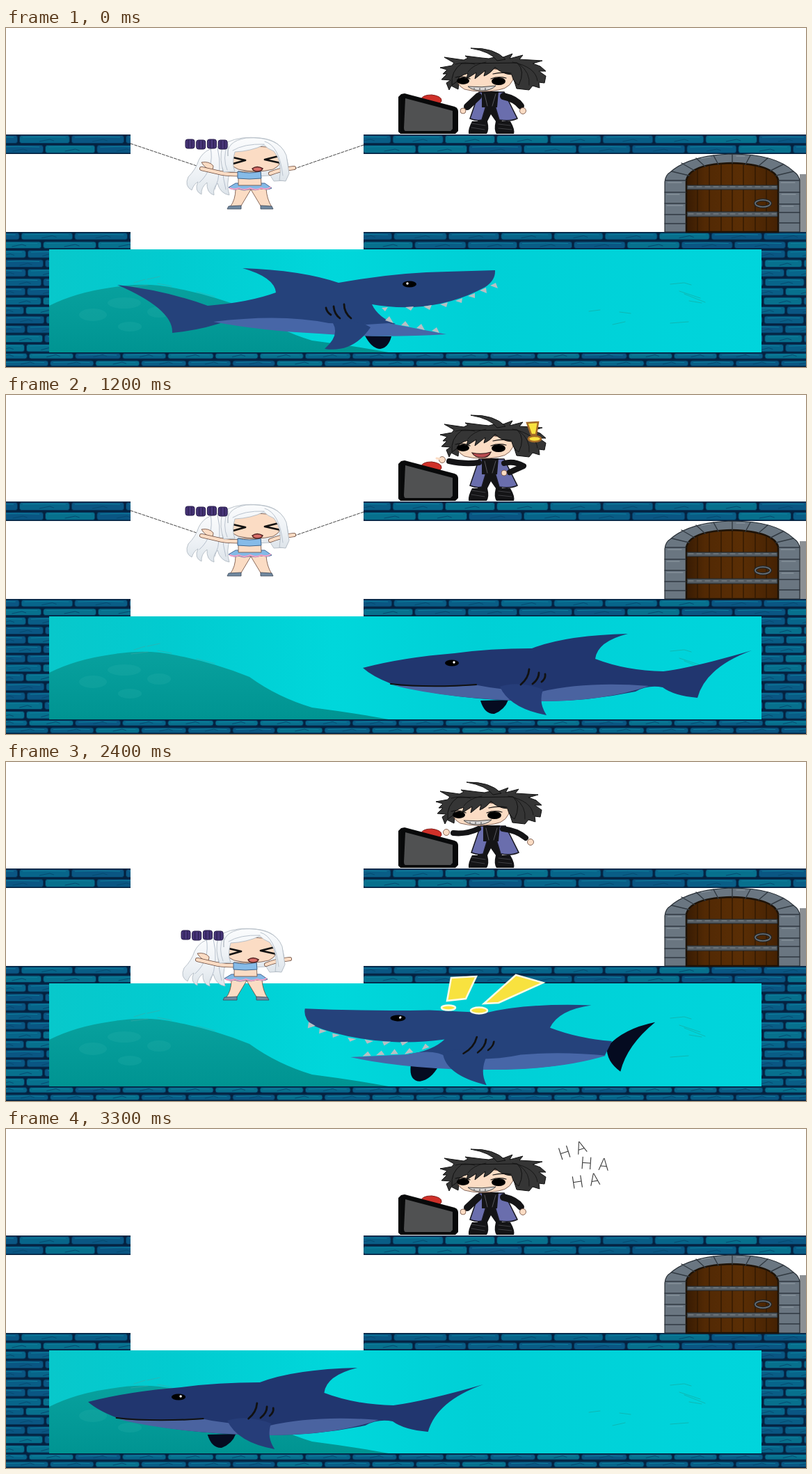
An HTML page for the animation above (3.76 s loop, 1150 by 487 pixels).

```html
<!DOCTYPE html>
<html lang="en">
<head>
<meta charset="utf-8">
<title>Shark tank</title>
<style>
  html, body { margin: 0; width: 100%; height: 100%; overflow: hidden; background: #fff; }
  #stage { display: block; width: 100vw; height: 100vh; }
  .part { visibility: hidden; }
  .part.on { visibility: visible; }
  .line { fill: none; stroke: #111; stroke-linecap: round; stroke-linejoin: round; }
  .hair { fill: #353535; stroke: #111; stroke-width: 1; }
  .skin { fill: #fbdcc4; stroke: #6b4a3c; stroke-width: .8; }
  .silver { fill: url(#silver); stroke: #b3bbc5; stroke-width: .9; }
  .black { fill: #141416; }
  .coat { fill: #6a6ead; stroke: #17171f; stroke-width: 1.5; }
  .limb { fill: none; stroke-linecap: round; stroke-linejoin: round; }
  .back { fill: #25427b; }
  .belly { fill: #4766a7; }
  .dark { fill: #050b20; }
  .teeth { fill: #b9bfc4; }
  .mark { fill: #f8e23f; stroke: #fffbe6; stroke-width: 2.5; }
  #ha text { font: 200 24px Inter, "Open Sans", sans-serif; letter-spacing: 8px; fill: #333; }
</style>
</head>
<body>
<svg id="stage" viewBox="0 0 1150 487" preserveAspectRatio="none">
  <defs>
    <linearGradient id="water">
      <stop offset="0" stop-color="#08c8cb"/><stop offset=".18" stop-color="#02cbd0"/>
      <stop offset=".4" stop-color="#00d7db"/><stop offset=".6" stop-color="#00d0d6"/>
      <stop offset="1" stop-color="#00d5dc"/>
    </linearGradient>
    <linearGradient id="hill" x2="0" y2="1">
      <stop offset="0" stop-color="#08a19e"/><stop offset="1" stop-color="#009492"/>
    </linearGradient>
    <linearGradient id="wood">
      <stop offset="0" stop-color="#371b03"/><stop offset=".2" stop-color="#522904"/>
      <stop offset=".6" stop-color="#5a2e05"/><stop offset="1" stop-color="#452203"/>
    </linearGradient>
    <linearGradient id="silver" x2="0" y2="1">
      <stop offset="0" stop-color="#fbfcfd"/><stop offset=".6" stop-color="#edf1f5"/>
      <stop offset="1" stop-color="#dde4ea"/>
    </linearGradient>

    <g id="boyHead">
      <path class="hair" d="M624,57L641,54 644,50 630,42 658,46 664,43 660,40 684,43 694,44 706,41 712,43 728,37 724,44 743,39 738,45 771,47 757,51 768,55 776,62 766,62 776,69 774,79 766,78 767,86 757,83 752,89 734,87 728,68 690,60 652,68 650,88 640,83 637,89 633,79 639,75 626,74 634,66 628,66 634,60Z"/>
      <path class="skin" d="M649,64Q645,81 659,88Q682,94 708,89Q728,86 731,66Q700,52 649,64Z"/>
      <path class="hair" d="M641,82Q639,62 655,51L735,50Q747,62 737,82Q729,77 727,67Q712,66 703,56Q697,65 687,69L689,61 674,73 676,64 662,73 664,65Q650,69 648,77Z"/>
      <path class="hair" d="M668,29Q702,28 718,45L706,47Q697,34 668,29Z"/>
      <path class="line" stroke-width=".8" d="M646,52Q660,48 674,52M664,63Q672,52 690,49M738,52Q754,64 752,82M728,49Q762,56 764,76"/>
      <ellipse cx="657" cy="76" rx="9" ry="5"/><ellipse cx="708" cy="76.500" rx="10" ry="5.500"/>
      <path class="line" stroke-width="1.200" d="M700,66Q712,63 726,65M646,71Q657,68 667,73M697,73Q708,69 719,72"/>
    </g>
    <path id="grin" d="M664,84Q684,86 704,83Q697,90 684,90Q671,90 664,84ZM673,86V88M681,86V89M689,86V89" fill="#d9d6d5" stroke="#444" stroke-width="1"/>
    <g id="boyLegs">
      <path class="black" d="M682,110H706L713,134H725Q732,146 730,152H705Q701,146 704,134L697,124 692,134Q695,146 691,152H665Q664,145 670,134H678Z"/>
      <path class="line" style="stroke:#4b4b50" stroke-width=".8" d="M669,137L689,140M669,143L688,146M708,138L725,140M708,144L727,146"/>
    </g>
    <g id="boyCoat">
      <path class="coat" d="M680,92L667,130Q676,134 684,132L690,112 703,112 709,132Q724,135 735,130L716,92Z"/>
      <path class="black" d="M684,91H708L706,114H684Z"/>
      <path class="line" style="stroke:#55555c" stroke-width="1" d="M688,95L692,112M704,95L699,112"/>
    </g>

    <path id="girlArms" class="limb" d="M337,210Q318,211 303,207L281,202M380,209Q394,203 414,201"/>
    <g id="girlTop">
      <path class="silver" d="M318,164Q338,155 365,158Q398,161 404,189Q409,207 402,219L385,220 380,212 335,214 314,206Z"/>
      <path class="silver" d="M318,170Q287,169 277,190Q273,203 262,214Q256,227 267,233Q270,224 276,221Q270,234 281,239Q280,229 289,222Q288,237 299,240Q297,230 304,223Q308,238 321,240Q316,225 322,206Z"/>
      <path class="line" style="stroke:#b5bfcc" stroke-width="1" d="M294,172Q300,202 278,222M304,172Q312,205 300,232M312,174Q308,200 316,232"/>
      <path class="skin" d="M297,205Q286,202 281,193Q292,191 298,198Z"/>
      <use href="#girlArms" stroke="#6b4a3c" stroke-width="6"/>
      <use href="#girlArms" stroke="#fbdcc4" stroke-width="4.500"/>
      <path class="skin" d="M334,206H366L367,226H334Z"/>
      <path d="M333,206Q350,210 366,206L367,216Q350,218 333,216Z" fill="#86bbe8" stroke="#41678e"/>
      <path class="skin" d="M319,180Q318,197 334,203Q360,209 384,203Q399,196 397,176Q360,163 319,180Z"/>
      <path class="line" stroke-width="2.800" d="M322,185L344,190 323,196M396,183L372,189 395,194"/>
      <path d="M354,202Q361,197 369,202Q367,206 361,206Q356,206 354,202Z" fill="#d96d67" stroke="#502020" stroke-width="1.500"/>
      <path class="silver" d="M319,184Q316,163 345,158Q392,155 403,183L407,209 402,220 393,219Q398,192 385,177Q375,173 371,168Q352,177 329,178Q324,195 329,206L313,207Q306,190 311,170L319,166Z"/>
      <path class="line" style="stroke:#bac3ce" stroke-width="1" d="M372,163Q393,169 398,212M318,168Q311,188 318,204M326,176Q342,166 371,167"/>
    </g>
    <g id="skirt">
      <path d="M330,223H372L382,230Q375,234 367,230Q359,235 351,231Q342,235 335,231Q328,234 320,229Z" fill="#84b9e6" stroke="#466995"/>
      <path class="line" style="stroke:#ef9fc6" stroke-width="2" d="M322,230Q328,233 335,230Q342,234 351,230Q359,234 367,230Q375,233 380,229"/>
    </g>
    <g id="girlStand">
      <path class="skin" d="M330,231L352,232 337,257H322Q330,247 330,231ZM352,232L374,231Q375,246 382,257H367Z"/>
      <path d="M320,256L338,255V260H318ZM366,255L382,256 384,260H366Z" fill="#728aa1" stroke="#384657" stroke-width=".8"/>
      <use href="#skirt"/><use href="#girlTop"/>
      <g id="curlers" fill="#473578" stroke="#241947"/>
    </g>

    <g id="sharkOpen">
      <path class="dark" d="M966,363Q922,374 906,401Q910,421 934,435Q934,397 966,363Z"/>
      <path class="dark" d="M633,437Q636,459 652,459Q667,456 673,436Z"/>
      <path class="back" d="M462,361Q545,362 640,357L722,358Q776,342 869,342Q824,350 818,376Q862,390 911,392L906,413Q830,438 744,438L650,431 625,421Q659,415 672,398Q632,405 598,404Q527,402 480,385Q463,376 462,361Z"/>
      <path class="belly" d="M544,428L625,421Q660,411 684,424Q745,427 786,416Q842,409 908,413Q845,436 745,439Q632,443 544,428Z"/>
      <path class="back" d="M674,417Q686,449 748,461Q733,442 738,419Q702,405 674,417Z"/>
      <path class="teeth" d="M472,380L473,389 483,385ZM490,389L491,396 501,392ZM510,395L512,401 521,397ZM533,400L538,406 546,402ZM558,402L563,408 571,404ZM584,404L588,410 596,404ZM610,404L614,409 621,403ZM561,426L567,419 573,425ZM580,424L586,417 592,423ZM600,422L604,414 611,421ZM620,421L625,412 632,418ZM643,414L646,405 653,410Z"/>
      <ellipse cx="598" cy="370" rx="11" ry="4.500"/><circle cx="601" cy="369" r="1.700" fill="#fff"/>
      <path class="line" stroke-width="2.800" d="M717,393Q717,408 704,417M731,396Q733,406 724,415M743,399Q744,405 738,411"/>
    </g>
    <g id="sharkClosed">
      <path class="dark" d="M682,439Q688,459 702,458Q717,452 722,438Z"/>
      <path d="M513,392Q570,377 645,371Q695,364 756,364Q805,345 894,343Q850,354 847,379Q891,396 945,397Q990,391 1072,367Q1006,391 994,435Q960,432 944,420Q923,416 905,426Q833,441 760,440Q640,438 554,415Q526,404 513,392Z" fill="#21366f"/>
      <path d="M556,417Q614,421 678,417Q717,425 770,426Q835,411 924,418Q858,441 760,440Q637,437 556,417Z" fill="#4a63a0"/>
      <path d="M710,419Q724,450 777,460Q765,442 772,423Q737,410 710,419Z" fill="#263d79"/>
      <path class="line" stroke-width="2" d="M553,415Q607,421 676,416"/>
      <ellipse cx="641" cy="385" rx="10" ry="4.500"/><circle cx="644" cy="384" r="1.700" fill="#fff"/>
      <path class="line" stroke-width="2.800" d="M752,394Q751,407 740,416M766,399Q766,408 757,415M775,401Q776,407 770,412"/>
    </g>
    <g id="sharkWide">
      <path class="dark" d="M516,442Q526,461 538,461Q550,459 554,443Z"/>
      <path class="back" d="M160,369Q230,377 290,399Q350,394 388,380Q386,358 340,345Q425,348 478,366Q560,351 635,350L703,348Q704,362 689,372Q642,398 585,401Q552,402 526,397Q535,416 560,425L520,440 430,437 320,420Q282,434 239,438Q241,404 160,369Z"/>
      <path class="belly" d="M298,422Q396,410 464,424L519,426 550,424 633,440Q535,446 450,439Q366,435 298,422Z"/>
      <path class="back" d="M470,424Q480,442 458,461Q499,467 524,430Q496,413 470,424Z"/>
      <path class="teeth" d="M704,366L707,374 696,370ZM690,373L691,381 681,377ZM674,381L674,388 664,385ZM656,388L655,395 646,392ZM635,394L633,401 624,397ZM612,398L609,405 600,400ZM586,400L582,406 574,401ZM540,402L545,407 549,401ZM545,420L551,414 557,424ZM568,427L574,421 580,429ZM590,431L597,425 602,434ZM612,435L619,430 623,438Z"/>
      <ellipse cx="580" cy="368" rx="10" ry="4.500"/><circle cx="577" cy="367" r="1.700" fill="#fff"/>
      <path class="line" stroke-width="2.800" d="M460,402Q461,408 467,412M471,400Q472,411 480,417M486,397Q486,409 496,417"/>
    </g>
  </defs>

  <rect width="1150" height="487" fill="#fff"/>

  <g id="tank">
    <rect x="61" y="318" width="1026" height="149" fill="url(#water)"/>
    <path d="M62,399Q100,380 150,373Q200,364 245,374Q300,385 350,405Q390,434 440,449Q495,456 550,466H62Z" fill="url(#hill)"/>
    <g fill="#2fb5ae" opacity=".22">
      <ellipse cx="125" cy="412" rx="20" ry="9"/><ellipse cx="170" cy="395" rx="24" ry="8"/>
      <ellipse cx="178" cy="429" rx="17" ry="7"/><ellipse cx="220" cy="408" rx="17" ry="8"/>
    </g>
    <path class="line" style="stroke:#3fa9a5" opacity=".6" d="M184,366l16,-5M203,361l18,-4M218,367l20,4M274,379l26,7M180,372l24,-3"/>
    <path class="line" style="stroke:#17a89f" opacity=".65" d="M955,368l20,-2 10,3M968,378l30,10M975,382l30,12M982,392l18,3M955,424l26,-2M838,407l16,-2M882,408l16,2M872,426l18,-4"/>
  </g>
  <g id="walls"/>

  <g id="door">
    <path d="M1141,210H1150V293H1141Z" fill="#8c9094"/>
    <path d="M947,293V221Q948,211 955,207Q982,183 1043,181Q1106,181 1132,206Q1141,212 1141,221V293Z" fill="#6a7681" stroke="#252c33" stroke-width="1.200"/>
    <path d="M978,293V218Q984,195 1044,194Q1104,196 1110,218V293Z" fill="url(#wood)" stroke="#1d1207" stroke-width="2.500"/>
    <path class="line" style="stroke:#2c1602" stroke-width="1.200" d="M994,204V293M1011,198V293M1028,195V293M1044,195V293M1060,195V293M1077,198V293M1093,204V293"/>
    <path d="M979,226H1109V232H979ZM979,264H1109V271H979Z" fill="#555c62" stroke="#20262b"/>
    <path class="line" style="stroke:#8d959b" stroke-width=".8" stroke-dasharray="7 5" d="M981,228H1107M981,267H1107"/>
    <path class="line" style="stroke:#313941" stroke-width="1.400" d="M948,219H977M947,236H977M947,252H977M947,268H977M947,281H977M1111,219H1141M1111,236H1141M1111,253H1141M1111,265H1141M1111,280H1141M957,206L982,212M971,194L990,205M992,187L1005,199M1017,183L1024,196M1044,182V194M1070,183L1063,196M1095,187L1082,198M1117,196L1099,205M1132,206L1107,212"/>
    <path class="line" style="stroke:#929da6" stroke-width="1" d="M951,222H971M950,239H968M950,255H973M1114,222H1134M1115,239H1135M1115,256H1132M1000,187L1013,185M1050,184H1062"/>
    <ellipse cx="1088" cy="252" rx="11" ry="5" fill="none" stroke="#20262b" stroke-width="4"/>
    <ellipse cx="1088" cy="252" rx="11" ry="5" fill="none" stroke="#6d757b" stroke-width="1.500"/>
  </g>

  <g id="shark">
    <use id="wide" class="part" href="#sharkWide"/>
    <use id="open" class="part" href="#sharkOpen"/>
    <use id="closed" class="part" href="#sharkClosed"/>
  </g>
  <g id="alarm" class="part mark">
    <path d="M640,310L676,308 661,340 634,343ZM733,306L772,317 708,346 687,347Z"/>
    <ellipse cx="636" cy="353" rx="10" ry="3.500"/><ellipse cx="680" cy="357" rx="12" ry="4.500"/>
  </g>

  <g id="hang" class="part">
    <path d="M179,166L280,200M514,168L415,202" class="line" style="stroke:#444" stroke-width="1" stroke-dasharray="4 2"/>
    <use href="#girlStand"/>
  </g>
  <use id="fall" class="part" href="#girlStand" transform="translate(-6 82)"/>
  <g id="swim" class="part" transform="translate(7 186)">
    <path class="silver" d="M335,158Q285,155 274,178Q271,187 280,202Q264,224 272,236L282,227Q280,239 293,239L297,231Q303,240 315,238L334,210Z"/>
    <path class="skin" d="M330,228L350,231 337,242 305,254 293,253ZM360,229L377,227 419,247 411,252 382,242Z"/>
    <path d="M293,251L310,253 304,256H291ZM408,251L419,245 427,250 415,252Z" fill="#728aa1" stroke="#384657"/>
    <use href="#skirt"/><use href="#girlTop"/>
  </g>

  <g id="idle" class="part">
    <use href="#boyLegs"/><use href="#boyCoat"/>
    <path class="limb" stroke="#141416" stroke-width="10" d="M679,98L663,113M715,98Q733,102 740,112"/>
    <circle class="skin" cx="657" cy="119" r="4"/><circle class="skin" cx="743" cy="119" r="4.500"/>
    <use href="#boyHead"/><use href="#grin"/>
  </g>
  <g id="alert" class="part">
    <use href="#boyLegs"/><use href="#boyCoat"/>
    <path class="limb" stroke="#141416" stroke-width="8" d="M680,97Q660,100 637,95M716,98Q730,94 744,102L724,111"/>
    <circle class="skin" cx="627" cy="93" r="4.500"/><path class="line" style="stroke:#fbdcc4" stroke-width="3" d="M626,92L619,91"/><circle class="skin" cx="716" cy="112" r="4"/>
    <use href="#boyHead"/>
    <path d="M670,83Q684,86 697,82Q694,90 684,90Q674,90 670,83Z" fill="#b84c50" stroke="#361c1c" stroke-width="1.200"/>
    <path class="mark" style="stroke:#a36a28" stroke-width="1" d="M749,40L765,39 762,57H755Z"/><ellipse class="mark" style="stroke:#a36a28" cx="760" cy="63" rx="9" ry="4"/>
  </g>
  <g id="lean" class="part">
    <use href="#boyLegs"/><use href="#boyCoat" transform="matrix(1 0 -.55 1 63 0)"/>
    <path class="black" d="M692,94H719L702,131 674,133Z"/>
    <path class="limb" stroke="#141416" stroke-width="10" d="M727,97Q742,101 744,114"/><circle class="skin" cx="740" cy="121" r="4.500"/>
    <g transform="matrix(1 .05 -.4 1 52 -34.500)"><use href="#boyHead"/><use href="#grin"/></g>
  </g>
  <g id="podium">
    <path d="M597,102Q599,96 612,96Q627,98 626,105L623,109Z" fill="#cf3029" stroke="#801c18"/>
    <path d="M568,95L573,94 645,113Q650,115 650,120V148L646,152H567L564,149V99Z" fill="#08090a"/>
    <path d="M574,101L642,119V145L639,148H574Q572,147 572,144Z" fill="#505152"/>
  </g>
  <g id="press" class="part">
    <use href="#boyLegs"/><use href="#boyCoat" transform="translate(2 0)"/>
    <path class="limb" stroke="#141416" stroke-width="8" d="M679,96Q662,104 643,102M714,96Q734,98 747,109"/>
    <circle class="skin" cx="633" cy="101" r="4.500"/><circle class="skin" cx="754" cy="115" r="4.500"/>
    <g id="pressHead"><use href="#boyHead"/><use href="#grin"/></g>
  </g>

  <g id="ha" class="part">
    <text transform="translate(797 45) rotate(-18)">HA</text>
    <text transform="translate(825 57) rotate(4)">HA</text>
    <text transform="translate(814 86) rotate(-9)">HA</text>
  </g>
</svg>
<script>
const $ = id => document.getElementById(id);

function add(parent, tag, attrs) {
  const node = document.createElementNS("http://www.w3.org/2000/svg", tag);
  for (const key in attrs) node.setAttribute(key, attrs[key]);
  return parent.appendChild(node);
}

let seed = 11;
const random = () => (seed = seed * 16807 % 2147483647) / 2147483647;

// The first joint sits at `joint`; every other row is shifted by almost half a brick.
function wall(x, y, width, height, rowHeight, length, joint) {
  const box = add($("walls"), "svg", { x, y, width, height });
  add(box, "rect", { width, height, fill: "#04213f" });
  const tones = ["#07658a", "#0a5683", "#07708d", "#095d86"];
  for (let row = 0, top = 0; top < height - 1; row++, top += rowHeight) {
    let left = joint - length + (row % 2 ? length * .45 : 0);
    if (left > 0) left -= length;
    while (left < width) {
      const size = length * (.96 + random() * .08);
      const right = left + size;
      add(box, "rect", {
        x: left + 1.5, y: top + 1.5, width: size - 3, height: rowHeight - 3, rx: 3,
        fill: tones[random() * 4 | 0], stroke: "#06365b"
      });
      add(box, "path", {
        d: `M${left + 6},${top + 4}Q${left + size / 2},${top + 2.5} ${right - 7},${top + 4}`,
        fill: "none", stroke: "#0d7f9d"
      });
      add(box, "path", {
        d: `M${left + size * .4},${top + rowHeight - 4}l${size * .2},-3 6,2`,
        fill: "none", stroke: "#064a70"
      });
      left = right;
    }
  }
}

for (const [y, height] of [[153, 28], [293, 25]]) {
  wall(0, y, 179, height, height / 2, 76, 21);
  wall(514, y, 636, height, height / 2, 76, 40);
}
wall(0, 318, 62, 148, 13.5, 58, 28);
wall(1086, 318, 64, 148, 13.5, 58, 34);
wall(0, 466, 1150, 21, 10.5, 66, 30);

for (let i = 0; i < 4; i++) {
  const x = 258 + i * 15.7;
  const y = 160 + (i % 2);
  add($("curlers"), "rect", { x, y, width: 13, height: 13, rx: 3 });
  add($("curlers"), "path", { d: `M${x + 4},${y + 1}v11M${x + 9},${y + 1}v11` });
}

const flip = x => `translate(${x} 0) scale(-1 1)`;
const scenes = [
  ["idle hang wide", ""],
  ["idle hang open", flip(1326)],
  ["idle hang open", flip(1473)],
  ["idle hang closed", "translate(12 0)"],
  ["alert hang closed", ""],
  ["lean hang open", ""],
  ["lean hang open", ""],
  ["press hang open", "translate(-17 0)"],
  ["press fall open alarm", "matrix(1 .035 -.25 1 58 -23)"],
  ["press swim open", ""],
  ["idle ha closed", "translate(-235 0)"],
  ["idle ha closed", "translate(-403.200 0) scale(1.016 1)"]
];
const parts = document.querySelectorAll(".part");
const start = performance.now();
let shown = -1;

function draw() {
  const time = (performance.now() - start) % 3760;
  const index = Math.min(11, Math.floor(time / 300));
  if (index !== shown) {
    shown = index;
    const [names, pose] = scenes[index];
    const visible = names.split(" ");
    for (const part of parts) part.classList.toggle("on", visible.includes(part.id));
    $("shark").setAttribute("transform", pose);
    $("pressHead").setAttribute("transform", `translate(${index === 9 ? -8 : -6} 0)`);
  }
  requestAnimationFrame(draw);
}
draw();
</script>
</body>
</html>
```
